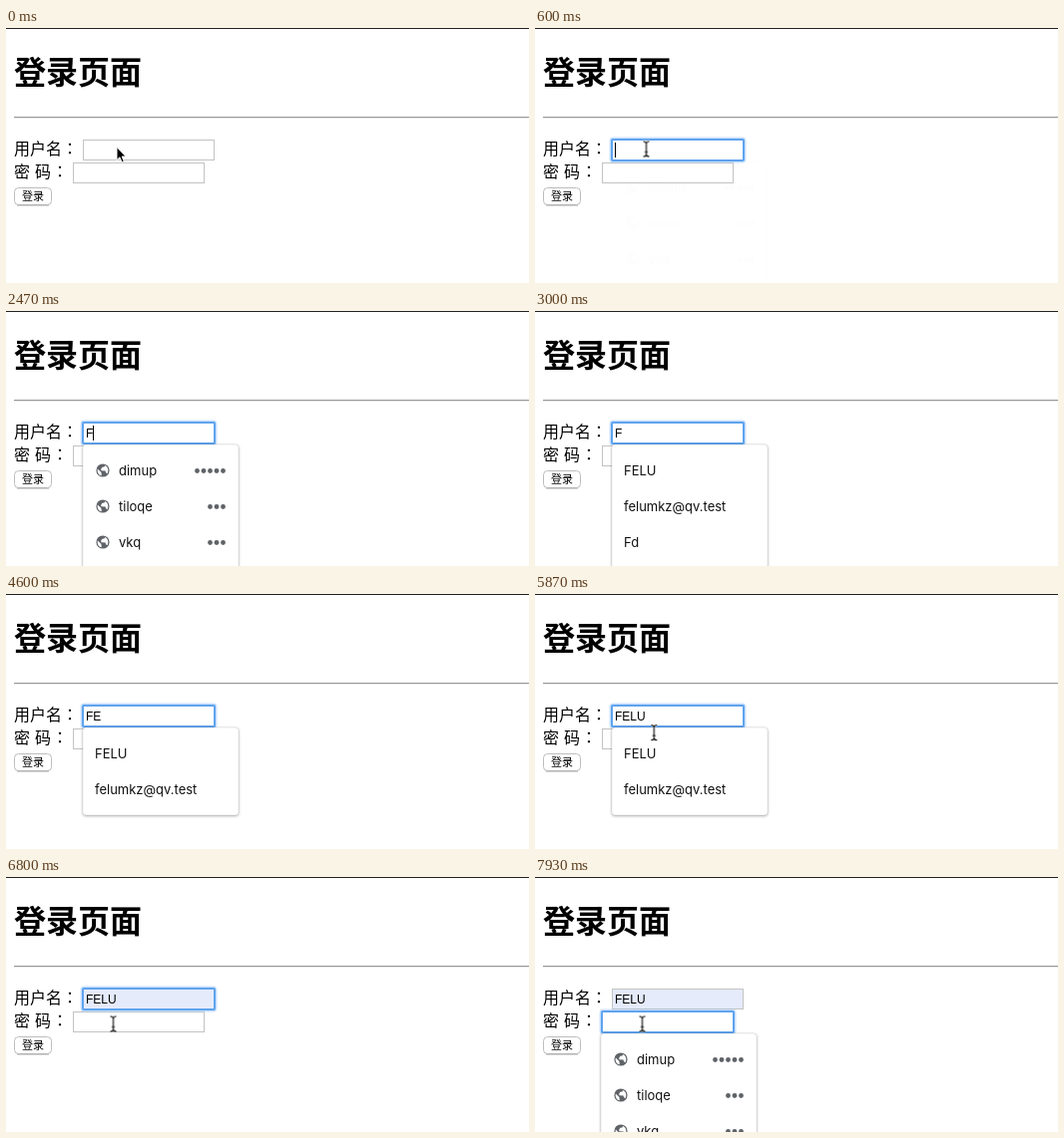
Write an HTML page that moves like this. It is 524x256 px and loops after 8000 ms.

```html
<!DOCTYPE html>
<html lang="zh-CN">
<head>
<meta charset="utf-8">
<title>登录页面</title>
<style>
  html, body { margin: 0; width: 100%; height: 100%; overflow: hidden; background: #fff; }
  svg { display: block; width: 524px; height: 256px; }
  .cjk { font-family: "Noto Sans CJK SC", "Noto Sans CJK", sans-serif; font-size: 16px; }
  .colon { font-family: "Noto Sans CJK TC", "Noto Sans CJK", sans-serif; font-size: 16px; }
  .value { font: 12px "Liberation Sans", sans-serif; }
  .item { font: 13px Inter, Roboto, sans-serif; fill: #111; }
  .box { fill: #fff; stroke: #c3c3c3; }
  .popup { filter: drop-shadow(0 1px 1.5px rgba(0, 0, 0, .3)); }
  .caret { fill: #000; }
</style>
</head>
<body>
<svg viewBox="0 0 524 256">
  <defs>
    <g id="globe">
      <circle r="6.6" fill="#5f6368"/>
      <path d="M-5.2 -1.6L-1.6 2L-1.2 5.2C-4.6 4.6 -5.8 1.4 -5.2 -1.6ZM-1.8 -1.2L-.6 -3.2L1.6 -3.6L2 -5C4.6 -3.8 5.4 -1.8 5.3 .6L4.6 3.2L3 2.2L2.6 .4L-1.6 .2Z" fill="#fff"/>
    </g>
    <g id="ring" fill="none">
      <rect x="-1" y="-1" width="134" height="23" rx="2.5" stroke="#8abdf8" stroke-opacity=".45" stroke-width="3"/>
      <rect x="0" y="0" width="132" height="21" rx="1" stroke="#5fa3ee" stroke-width="2"/>
    </g>
  </defs>

  <rect width="524" height="256" fill="#fff"/>
  <rect width="524" height="1" fill="#222"/>
  <text class="cjk" x="8" y="56" style="font-size:32px;font-weight:700">登录页面</text>
  <rect x="8" y="89" width="516" height="1" fill="#969a98"/>
  <rect x="8" y="90" width="516" height="1" fill="#e6e6e6"/>

  <text class="cjk" x="8" y="127">用户名</text>
  <text class="colon" x="56" y="127" lang="zh-TW">：</text>
  <text class="cjk" x="8" y="150">密</text>
  <text class="cjk" x="29" y="150">码</text>
  <text class="colon" x="46" y="150" lang="zh-TW">：</text>

  <rect class="box" x="77.5" y="112.5" width="131" height="20"/>
  <rect id="filled" x="78" y="113" width="130" height="19" fill="#e5ebfa"/>
  <rect class="box" x="67.5" y="135.5" width="131" height="20"/>
  <rect x="8.5" y="160.5" width="37" height="17" rx="4" fill="#fff" stroke="#bdbdbd"/>
  <path d="M11 178H43" stroke="#a8a8a8"/>
  <text class="cjk" x="16" y="173.3" style="font-size:11px">登录</text>

  <use id="userRing" href="#ring" x="77" y="112"/>
  <use id="passRing" href="#ring" x="67" y="135"/>
  <g id="typed"></g>
  <rect id="userCaret" class="caret" y="115" width="1" height="15"/>
  <rect id="passCaret" class="caret" x="70" y="138" width="1" height="15"/>

  <g id="popups"></g>

  <path id="arrow" d="M111 119.5V132.6L114 129.8L116.1 134.8L118.3 133.9L116.2 129H120.2Z" stroke="#fff" stroke-width="1"/>
  <g id="beam" fill="none">
    <path d="M-3 -7.5Q0 -7.5 0 -5.5Q0 -7.5 3 -7.5M0 -6V6M-3 7.5Q0 7.5 0 5.5Q0 7.5 3 7.5M-1.5 3H1.5" stroke="#fff" stroke-width="2.4" stroke-opacity=".7"/>
    <path d="M-3 -7.5Q0 -7.5 0 -5.5Q0 -7.5 3 -7.5M0 -6V6M-3 7.5Q0 7.5 0 5.5Q0 7.5 3 7.5M-1.5 3H1.5" stroke="#000" stroke-width="1.1"/>
  </g>
</svg>
<script>
const LOOP = 8000;
const WORD = 'FELU';
const ACCOUNTS = [['dimup', 5], ['tiloqe', 3], ['vkq', 3], ['soren', 5]];
const MATCHES = [WORD, 'felumkz@qv.test', 'Fd'];
const byId = id => document.getElementById(id);

// Each step is [time, value, easing to the next step]; without easing it holds.
function track(id, prop, steps) {
  const frames = steps.map(([time, value, easing = 'step-end']) =>
    ({ offset: time / LOOP, [prop]: value, easing }));
  frames.push({ offset: 1, [prop]: steps[steps.length - 1][1] });
  byId(id).animate(frames, { duration: LOOP, iterations: Infinity });
}

// Visible from the first time to the second, then toggled at each further time.
function toggle(id, ...times) {
  track(id, 'opacity', [[0, 0], ...times.map((time, i) => [time, 1 - i % 2])]);
}

function popup(id, x, y, rows, content) {
  const body = Array.from({ length: rows }, (_, i) => content(i, y + 26 + i * 36)).join('');
  byId('popups').insertAdjacentHTML('beforeend',
    `<g id="${id}"><rect class="popup" x="${x}" y="${y}" width="156" height="${rows * 36 + 16}" rx="3"
      fill="#fff" stroke="#000" stroke-opacity=".14" stroke-width=".6"/>${body}</g>`);
}

const accountRow = x => (i, y) => {
  const [name, dots] = ACCOUNTS[i];
  const marks = Array.from({ length: dots }, (_, k) =>
    `<circle cx="${x + 140.5 - k * 6.5}" cy="${y + .5}" r="2.4" fill="#5f6368"/>`).join('');
  return `<use href="#globe" x="${x + 20}" y="${y}"/>
    <text class="item" x="${x + 36}" y="${y + 5}">${name}</text>${marks}`;
};
const matchRow = (i, y) =>
  `${i ? '' : '<rect class="hover" x="77" y="142" width="156" height="36" fill="#e8e8ea"/>'}
   <text class="item" x="89" y="${y + 5}">${MATCHES[i]}</text>`;

popup('accounts', 77, 134, 4, accountRow(77));
popup('threeMatches', 77, 134, 3, matchRow);
popup('twoMatches', 77, 134, 2, matchRow);
popup('passAccounts', 66, 157, 4, accountRow(66));
document.querySelector('#threeMatches .hover').remove();
document.querySelector('#twoMatches .hover').id = 'hover';

const typedAt = [2470, 3130, 4870, 5200];
typedAt.forEach((time, i) => {
  byId('typed').insertAdjacentHTML('beforeend',
    `<text id="word${i}" class="value" x="80" y="127">${WORD.slice(0, i + 1)}</text>`);
  toggle('word' + i, time, typedAt[i + 1] || LOOP - 1);
});

toggle('userRing', 530, 7070);
toggle('passRing', 7070);
toggle('filled', 5930);
toggle('hover', 5930);
toggle('userCaret', 530, 1070, 1600, 2130, 2470, 3000, 3130, 3600, 4130, 4600, 4870, 5730);
track('userCaret', 'transform', [[0, 80], [2470, 87], [3130, 95], [4870, 102], [5200, 110]]
  .map(([time, x]) => [time, `translate(${x}px, 0px)`]));
toggle('passCaret', 7070, 7600);

track('accounts', 'opacity', [[0, 0], [600, 0, 'linear'], [800, 1], [2600, 0]]);
toggle('threeMatches', 2600, 3130);
track('twoMatches', 'opacity', [[0, 0], [3130, 1], [6270, 1, 'linear'], [6400, 0]]);
track('passAccounts', 'opacity', [[0, 0], [7070, 0, 'linear'], [7200, 1]]);

track('arrow', 'opacity', [[0, 1], [530, 0]]);
toggle('beam', 530, 2470, 5600);
track('beam', 'transform', [
  [0, 111.5, 121.5], [5600, 111.5, 121.5, 'ease-in-out'], [6130, 126.5, 155.5],
  [6470, 126.5, 155.5, 'ease-in-out'], [6800, 107.5, 147.5]
].map(([time, x, y, easing]) => [time, `translate(${x}px, ${y}px)`, easing]));
</script>
</body>
</html>
```
